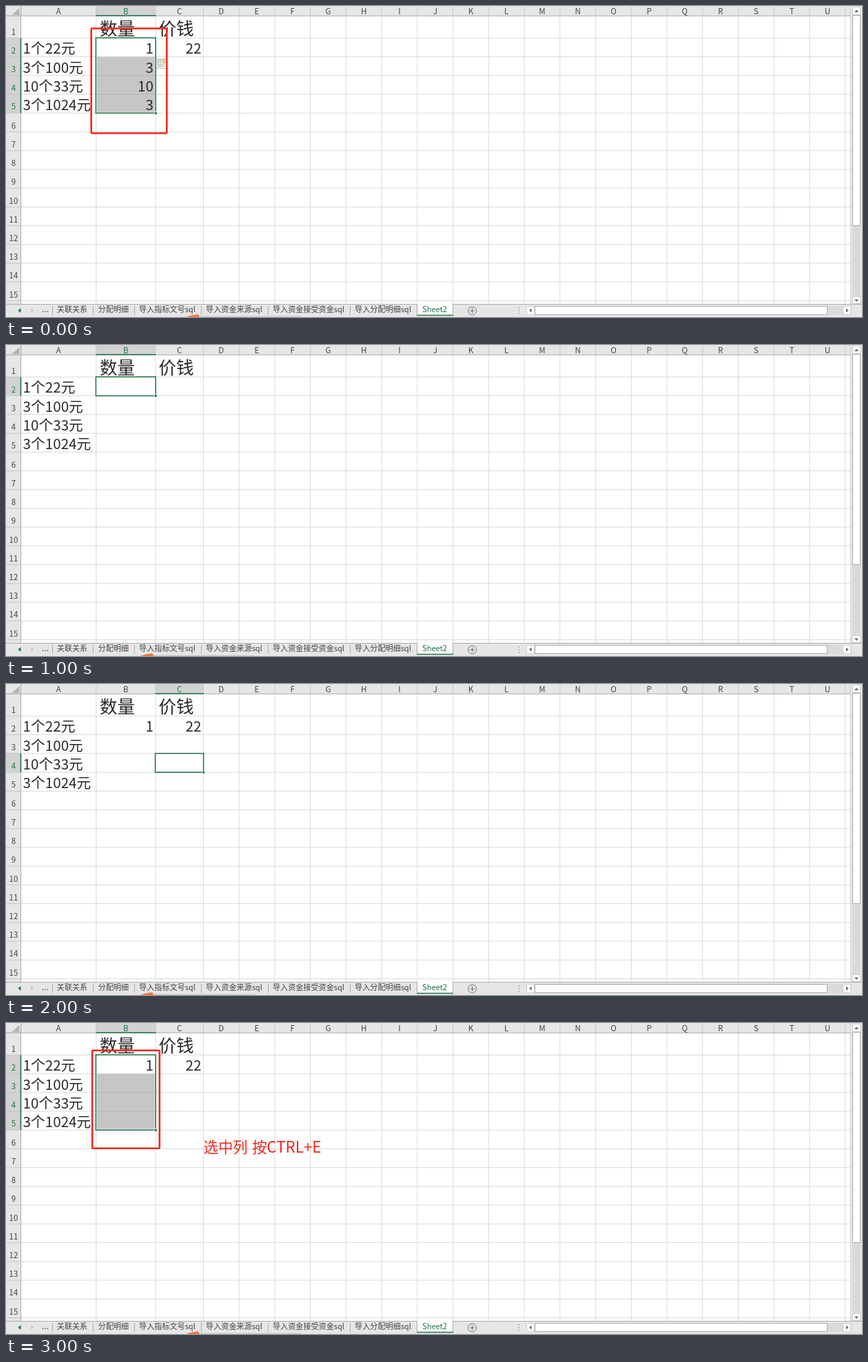
These frames come from a looping animation (1242 px wide and 451 px high, 4 s). An HTML page:

```html
<!DOCTYPE html>
<html lang="zh-CN">
<head>
<meta charset="utf-8">
<style>
html, body { margin: 0; width: 100%; height: 100%; overflow: hidden; background: #fff; }
svg { display: block; width: 1242px; height: 451px; font-family: "Noto Sans CJK SC", "Noto Sans CJK", "Noto Sans", sans-serif; }
text { white-space: pre; }
</style>
</head>
<body>
<svg id="stage" viewBox="0 0 1242 451"></svg>
<script>
const GREEN = '#217346', RED = '#f0281c', GRID = '#d9d9d9', BAR = '#e6e6e6', EDGE = '#ababab', INK = '#444', TEXT = '#2a2a2a';
const stage = document.getElementById('stage');

// Column and row boundaries
const colX = [21.7, 130.8, 217, ...Array.from({length: 19}, (_, i) => 286.4 + i * 51.74)];
const rowY = [14.2, ...Array.from({length: 15}, (_, i) => 46.4 + i * 27.22)];

const items = ['1个22元', '3个100元', '10个33元', '3个1024元'];
const tabs = [['关联关系', 96], ['分配明细', 156], ['导入指标文号sql', 234], ['导入资金来源sql', 331],
  ['导入资金接受资金sql', 439], ['导入分配明细sql', 547]];

// sel: column, first row, last row (zero-based)
const scenes = [
  {sel: [1, 1, 4], counts: [1, 3, 10, 3], price: 22, frame: [123.7, 32.5, 109.6, 152], icon: true, mark: 261},
  {sel: [1, 1, 1], counts: [], mark: 194.5},
  {sel: [2, 3, 3], counts: [1], price: 22, mark: 194.5},
  {sel: [1, 1, 4], counts: [1], price: 22, frame: [125.2, 39.8, 97.6, 142], hint: true, mark: 261}
];

const rect = (x, y, w, h, fill, more = '') =>
  `<rect x="${x}" y="${y}" width="${w}" height="${h}" fill="${fill}" ${more}/>`;
const path = (d, stroke, width = 1, fill = 'none') =>
  `<path d="${d}" stroke="${stroke}" stroke-width="${width}" fill="${fill}"/>`;
const tri = (d, fill) => path(d + 'z', 'none', 0, fill);
const text = (s, x, y, size, fill = TEXT, anchor = 'start', weight = 400) =>
  `<text x="${x}" y="${y}" font-size="${size}" fill="${fill}" text-anchor="${anchor}" font-weight="${weight}">${s}</text>`;
const cell = (s, x, row, anchor) => text(s, x, rowY[row] + 23, 20.7, TEXT, anchor, 300);

function grid() {
  return path(colX.slice(1).map(x => `M${x} 14V432`).join('') + rowY.slice(1).map(y => `M22 ${y}H1225`).join(''), GRID);
}

function headers([col, first, last]) {
  const x = colX[col], w = colX[col + 1] - x, y = rowY[first], h = rowY[last + 1] - y;
  let out = rect(0, 0, 1242, 14, BAR) + rect(0, 0, 22, 432, BAR) + rect(x, 0, w, 14, '#d2d2d2') + rect(0, y, 22, h, '#d2d2d2');
  out += path(colX.map(v => `M${v} 1V14`).join('') + rowY.map(v => `M0 ${v}H22`).join(''), '#c6c6c6');
  out += path('M0 14.3H1225M21.6 0V432', EDGE) + tri('M19.5 3V13H8.5', '#b4b4b4');
  out += path(`M${x - .5} 14H${x + w + .5}M21.5 ${y}V${y + h}`, GREEN, 1.6);
  for (let i = 0; i < 21; i++)
    out += text(String.fromCharCode(65 + i), (colX[i] + colX[i + 1]) / 2, 12, 11.5, i === col ? GREEN : INK, 'middle');
  for (let i = 0; i < 15; i++)
    out += text(i + 1, 11, rowY[i + 1] - 4.8, 11.5, i >= first && i <= last ? GREEN : INK, 'middle');
  return out;
}

function selection([col, first, last]) {
  const x = colX[col] - .4, y = rowY[first] - .2, w = colX[col + 1] + .2 - x, h = rowY[last + 1] - y;
  let out = '';
  if (last > first) {
    out += rect(x + 1.5, rowY[first + 1], w - 3, rowY[last + 1] - rowY[first + 1] - 1.5, '#c6c6c6');
    for (let r = first + 2; r <= last; r++) out += path(`M${x + 1.5} ${rowY[r]}H${x + w - 1.5}`, '#b2b2b2');
  }
  return out + rect(x, y, w, h, 'none', `stroke="${GREEN}" stroke-width="1.5"`)
    + rect(x + w - 2, y + h - 2, 4, 4, GREEN, 'stroke="#fff" stroke-width=".8"');
}

function fillIcon() {
  return rect(219.5, 76.5, 13, 14, '#f4f4f4', 'stroke="#c4c4c4"')
    + rect(221.5, 78.5, 7, 9, '#fff', 'stroke="#999" stroke-width=".8"')
    + path('M222 81.5H228M222 84.5H228M224.5 79V87', '#a9a9a9', .7)
    + tri('M229 77L226.5 82H229L227.5 86L232 80.5H229.5L231.5 77', '#e9b872');
}

function scrollbar() {
  return rect(1225, 0, 17, 432, BAR) + path('M1225.5 0V432', '#d0d0d0') + rect(1228, 14, 12, 408, '#dadada')
    + rect(1228.5, 13.5, 11, 305, '#fff', `stroke="${EDGE}"`)
    + rect(1228.5, 1.5, 11, 11, '#fff', 'stroke="#d0d0d0"') + rect(1228.5, 421.5, 11, 10, '#fff', 'stroke="#d0d0d0"')
    + tri('M1231 9H1237L1234 5.5', '#666') + tri('M1231 425.5H1237L1234 429', '#666');
}

function bottomBar(mark) {
  let out = rect(0, 432, 1242, 19, BAR) + path('M0 432.5H1242', EDGE);
  out += tri('M21.5 438V445L17.5 441.5', GREEN) + tri('M36.5 438.5V444.5L40 441.5', '#bdbdbd');
  out += text('...', 57, 443.5, 12, INK, 'middle');
  out += path([67, 126, 186, 283, 380, 499].map(x => `M${x}.5 435V448`).join(''), EDGE);
  for (const [name, x] of tabs) out += text(name, x, 443.7, 11.1, INK, 'middle');
  out += rect(596, 432, 53, 17, '#fff') + path('M596.5 432V448M648.5 432V448', EDGE) + path('M596 448.5H649', GREEN, 1.6);
  out += text('Sheet2', 622, 443.7, 11.1, GREEN, 'middle', 500);
  out += `<circle cx="676.5" cy="442" r="6" fill="none" stroke="#777"/>` + path('M673 442H680M676.5 438.5V445.5', '#777', 1.2);
  for (const y of [437, 441, 445]) out += rect(743.5, y, 1.5, 1.5, '#999');
  out += rect(755, 435, 472, 13, '#dadada') + rect(767.5, 435.5, 424, 12, '#fff', `stroke="${EDGE}"`);
  for (const x of [755.5, 1214.5]) out += rect(x, 435.5, 11, 12, '#fff', 'stroke="#d0d0d0"');
  out += tri('M762.5 438.5V444.5L759 441.5', '#666') + tri('M1219 438.5V444.5L1222.5 441.5', '#666');
  return out + path(`M${mark + 18} 450.2H${mark + 166}`, '#c2c2c2')
    + tri(`M${mark} 451Q${mark + 8} 448 ${mark + 18} 447L${mark + 19.5} 451`, '#f4733f');
}

function render(s) {
  let out = grid() + headers(s.sel) + selection(s.sel);
  out += text('数量', 136, 42.2, 25.5, TEXT, 'start', 300) + text('价钱', 221.5, 42.2, 25.5, TEXT, 'start', 300);
  items.forEach((name, i) => out += cell(name, 24.5, i + 1, 'start'));
  s.counts.forEach((n, i) => out += cell(n, 214, i + 1, 'end'));
  if (s.price) out += cell(s.price, 283.5, 1, 'end');
  if (s.icon) out += fillIcon();
  if (s.frame) out += rect(...s.frame, 'none', `rx="1.5" stroke="${RED}" stroke-width="2.6"`);
  if (s.hint) out += text('选中列', 286.5, 188, 21.4, RED) + text('按', 357, 188, 21.8, RED) + text('CTRL+E', 378.3, 188, 22.4, RED);
  stage.innerHTML = out + scrollbar() + bottomBar(s.mark);
}

let shown = -1;
function tick() {
  const step = Math.floor(performance.now() / 1000) % scenes.length;
  if (step !== shown) render(scenes[shown = step]);
  requestAnimationFrame(tick);
}
tick();
</script>
</body>
</html>
```
